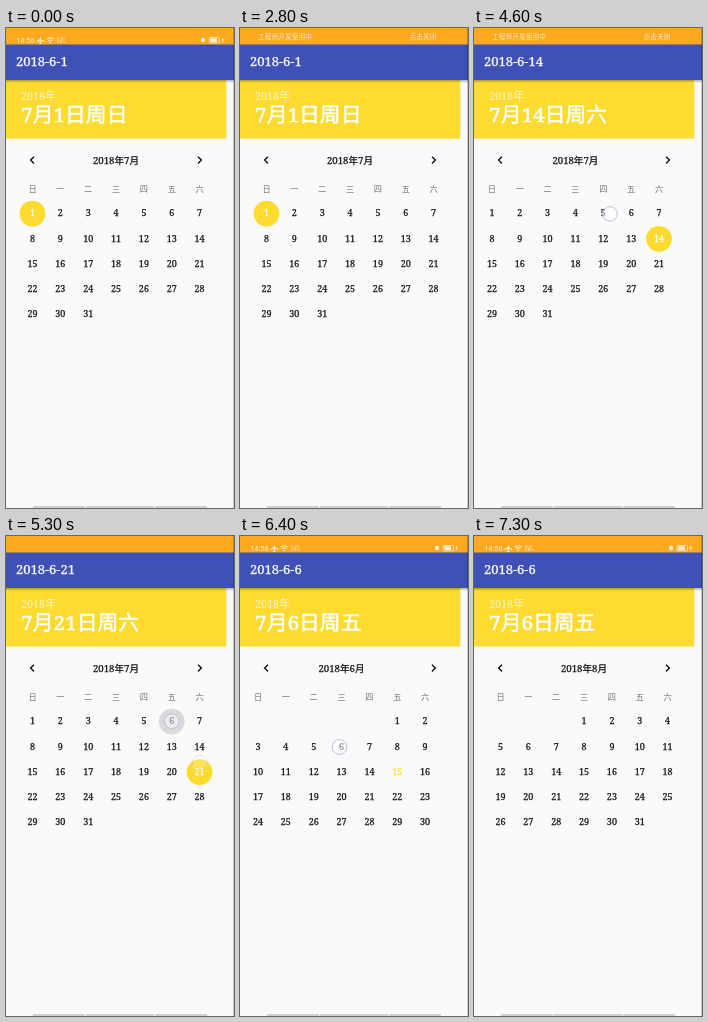
An HTML page that plays this animation: 228 px wide and 480 px high, repeating every 7.5 s.

```html
<!DOCTYPE html>
<html lang="zh-CN">
<head>
<meta charset="utf-8">
<title>Calendar</title>
<style>
  html, body { margin: 0; width: 100%; height: 100%; overflow: hidden; background: #fafafa; }
  svg { display: block; width: 100vw; height: 100vh; }
  text {
    font-family: "Noto Serif", "Noto Sans CJK SC", "Noto Sans CJK", serif;
    font-weight: 500; fill: #111; stroke: #111; stroke-width: .25;
  }
  .mid { text-anchor: middle; }
  .white text, .day.on { fill: #fff; stroke: #fff; }
  .status text {
    font-family: Roboto, "Noto Sans CJK SC", "Noto Sans CJK", sans-serif;
    font-weight: 400; fill: #fff; stroke: none;
  }
  .day { font-size: 9px; }
  .day.today { fill: #fddb30; stroke: #fddb30; }
  .week { font-size: 8.2px; fill: #707070; stroke: none; font-weight: 400; }
  .month { font-size: 9.6px; }
  .arrow { fill: none; stroke: #111; stroke-width: 1.4; }
  .ring { fill: #fff; fill-opacity: .55; stroke: #b3b9d8; stroke-width: .9; }
</style>
</head>
<body>
<svg viewBox="0 0 228 480" preserveAspectRatio="none">
  <defs>
    <linearGradient id="shade" x2="0" y2="1">
      <stop stop-opacity=".3"/>
      <stop offset="1" stop-opacity="0"/>
    </linearGradient>
    <clipPath id="view"><rect y="110" width="220" height="366"/></clipPath>
  </defs>
  <rect width="228" height="480" fill="#fafafa"/>
  <rect y="52" width="220.3" height="58.6" fill="#fddb30"/>
  <rect y="52" width="228" height="3" fill="url(#shade)"/>
  <rect width="228" height="17" fill="#fca920"/>
  <rect y="16.5" width="228" height="35.5" fill="#3f51b5"/>

  <g class="white">
    <text id="title" x="10" y="37.9" font-size="13"></text>
    <text x="15" y="72" font-size="10.8" opacity=".72" style="stroke:none">2018年</text>
    <text id="date" x="15" y="94.1" font-size="20.8" style="stroke-width:.5"></text>
  </g>

  <g id="icons" class="status">
    <text x="10" y="14.6" font-size="7.5">14:56</text>
    <path d="M34.3 8.6l.7 2.6 3.2 1.9v.9l-3.2-.9-.2 1.7.9.8v.5h-2.8v-.5l.9-.8-.2-1.7-3.2.9v-.9l3.2-1.9z" fill="#fff"/>
    <path d="M40.6 11q3.6-2.9 7.2 0M41.9 12.7q2.3-1.8 4.6 0" fill="none" stroke="#fff"/>
    <circle cx="44.2" cy="14.3" r=".9" fill="#fff"/>
    <text x="51" y="11.7" font-size="4.2">0.21</text>
    <text x="51" y="15.4" font-size="4.2">KB/s</text>
    <circle cx="197" cy="12" r="2.2" fill="#fff"/>
    <rect x="203" y="9.5" width="10.5" height="5.4" rx="1" fill="none" stroke="#fff" stroke-width=".8"/>
    <rect x="204" y="10.4" width="7" height="3.6" fill="#fff"/>
    <path d="M217 9.3l-1.7 3.1h1.2l-.5 2.8 2.1-3.6h-1.3z" fill="#fff"/>
  </g>
  <g id="notice" class="status" font-size="6.75">
    <text x="18" y="11.4">工程师开发使用中</text>
    <text x="169.5" y="11.4">点击关闭</text>
  </g>

  <g id="pages" clip-path="url(#view)"></g>
  <path class="arrow" d="M28 128.7l-3.4 3.4 3.4 3.4M192 128.7l3.4 3.4-3.4 3.4"/>
  <g id="touch"></g>
  <path d="M27 479h52M80 479h68M149 479h52" stroke="#cfcfcf" stroke-width="2"/>
  <rect x="227" width="1" height="480" opacity=".2"/>
</svg>

<script>
const LOOP = 7500, STEP = 100, WIDTH = 220, SWIPE = 470;
const WEEK = '日一二三四五六';
const MONTHS = [6, 7, 8];
const $ = id => document.getElementById(id);

// Finger offsets (dx, dy) are from the centre of the day in July.
const taps = [
  { at: 3300, day: 23, dx: 9.5, dy: -3 },
  { at: 3500, day: 3, dx: -10, dy: 9 },
  { at: 3900, day: 31 },
  { at: 4300, day: 14 },
  { at: 5100, day: 21, dy: -9 },
  { at: 5300, day: 6 }
];
const swipes = [
  { at: 5700, dir: -1 },
  { at: 6300, dir: 1 },
  { at: 6800, dir: 1 }
];

const clamp = u => Math.min(1, Math.max(0, u));
const ramp = (t, from, to) => clamp((t - from) / (to - from));
const ease = u => u < .5 ? 4 * u ** 3 : 1 - 4 * (1 - u) ** 3;
const swiped = (s, t) => s.dir * ease(ramp(t, s.at, s.at + SWIPE));
// A short drag that springs back.
const nudge = t => .039 * Math.sin(Math.PI * ramp(t, 4400, 4800));

function cell(month, day) {
  const i = new Date(2018, month - 1, 1).getDay() + day - 1;
  return [26.5 + i % 7 * 27.85, 185.2 + Math.floor(i / 7) * 25.27];
}
const label = (cls, x, y, s, id = '') =>
  `<text class="mid ${cls}" x="${x}" y="${y}" id="${id}">${s}</text>`;
const ring = (x, y, alpha = 1) =>
  `<circle class="ring" cx="${x}" cy="${y}" r="7.3" opacity="${alpha}"/>`;

function page(month) {
  const days = new Date(2018, month, 0).getDate();
  let s = `<g id="page${month}">`;
  if (month === 7) s += '<circle id="press" r="12.9" fill="#dadada"/><circle id="mark" r="12.9" fill="#fddb30"/>';
  s += label('month', 110, 135.5, `2018年${month}月`);
  [...WEEK].forEach((w, c) => s += label('week', 26.5 + c * 27.85, 164.2, w));
  for (let d = 1; d <= days; d++) {
    const [x, y] = cell(month, d);
    s += label(month === 6 && d === 15 ? 'day today' : 'day', x, y + 3.2, d, `d${month}-${d}`);
  }
  return s + '</g>';
}
$('pages').innerHTML = MONTHS.map(page).join('');

function place(id, day) {
  const el = $(id);
  el.style.display = day ? '' : 'none';
  if (!day) return;
  const [x, y] = cell(7, day);
  el.setAttribute('cx', x);
  el.setAttribute('cy', y + .4);
}

let last = -1;
function draw(t) {
  let selected = 1, pressed = 0, touch = '';
  for (const { at, day, dx = 0, dy = 0 } of taps) {
    const age = t - at;
    if (age < 0) break;
    if (age < 100) pressed = day;
    else selected = day;
    const [x, y] = cell(7, day);
    if (age <= 200) touch += ring(x + dx, y + dy, age < 200 ? 1 : .35);
  }

  const shift = nudge(t);
  if (shift > .02) touch += ring(144.5 - shift * WIDTH, 186);
  let pos = 7 + shift;
  for (const s of swipes) {
    const moved = swiped(s, t);
    pos += moved;
    if (t >= s.at && t <= s.at + 200) touch += ring(108 - moved * WIDTH, 211);
  }
  $('touch').innerHTML = touch;

  for (const m of MONTHS) $('page' + m).setAttribute('transform', `translate(${(m - pos) * WIDTH} 0)`);
  for (let d = 1; d <= 31; d++) $('d7-' + d).classList.toggle('on', d === selected);
  place('mark', selected);
  place('press', pressed);

  $('title').textContent = '2018-6-' + selected;
  $('date').textContent = `7月${selected}日周${WEEK[(selected - 1) % 7]}`;
  $('icons').setAttribute('opacity', .8 * (1 - ramp(t, 1800, 2100) + ramp(t, 5500, 5700)));
  $('notice').setAttribute('opacity', .75 * (ramp(t, 2600, 2800) - ramp(t, 4900, 5100)));
}

function frame(now) {
  const t = Math.floor(now % LOOP / STEP) * STEP;
  if (t !== last) draw(last = t);
  requestAnimationFrame(frame);
}
draw(0);
requestAnimationFrame(frame);
</script>
</body>
</html>
```
